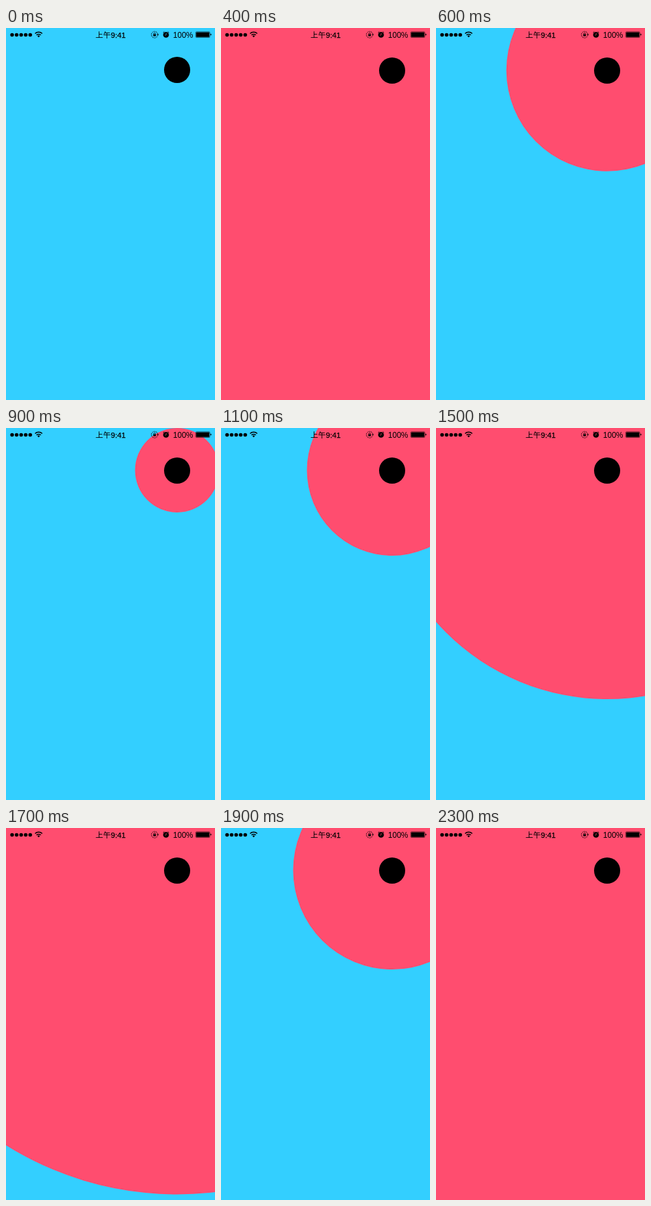
Recreate the animation shown at these times as an HTML page. Size 320 by 568 pixels, loop 2400 ms.

```html
<!DOCTYPE html>
<html lang="zh">
<head>
<meta charset="utf-8">
<style>
html, body { margin: 0; width: 100%; height: 100%; overflow: hidden; background: #33cfff; }
svg { display: block; width: 320px; height: 568px; }
text { font: 12px "Liberation Sans", Arial, "Noto Sans CJK SC", "Noto Sans CJK", sans-serif; }
.line { fill: none; stroke: #000; }
</style>
</head>
<body>
<svg viewBox="0 0 320 568">
  <rect width="320" height="568" fill="#33cfff"/>
  <circle id="page" cx="262" cy="64.5" fill="#ff4d6f"/>
  <circle id="button" cx="262" r="20"/>

  <!-- signal and wifi -->
  <path d="M9.3 10.5h28" stroke="#000" stroke-width="5.6" stroke-linecap="round" stroke-dasharray="0 6.95"/>
  <g class="line" stroke-width="1.5">
    <path d="M44.5 8.5a7.8 7.8 0 0 1 11 0"/>
    <path d="M46.6 10.8a4.8 4.8 0 0 1 6.8 0"/>
  </g>
  <path d="M50 14.2l-1.9-1.9a2.7 2.7 0 0 1 3.8 0z"/>

  <text x="137" y="14.6" style="font-size:11.7px">上午<tspan stroke="#000" stroke-width=".25">9:41</tspan></text>

  <!-- rotation lock -->
  <g class="line">
    <circle cx="227.5" cy="10.2" r="4.9" stroke-width=".8" stroke-dasharray="2.2 .8"/>
    <path d="M226.2 9.8v-1a1.3 1.3 0 0 1 2.6 0v1" stroke-width=".8"/>
  </g>
  <path d="M225.5 9.6h4v3h-4zM230.9 9.4h3.2l-1.6 2z"/>

  <!-- alarm -->
  <mask id="hands">
    <rect x="238" y="3" width="14" height="14" fill="#fff"/>
    <path d="M245.2 7.6v3l-1.8.6" fill="none" stroke="#000" stroke-width=".7"/>
  </mask>
  <circle cx="245" cy="10.4" r="4.4" mask="url(#hands)"/>
  <path class="line" d="M240.6 7.1l1.7-1.6M249.4 7.1l-1.7-1.6" stroke-width="1"/>

  <text x="255.8" y="15">100%</text>

  <!-- battery -->
  <rect class="line" x="290.5" y="5.7" width="21.6" height="8.8" rx="1.2" stroke-width=".5"/>
  <rect x="291.2" y="6.4" width="20.2" height="7.4" rx=".6"/>
  <path d="M313 8.6q1.5.3 1.5 1.5t-1.5 1.5z"/>
</svg>
<script>
const LOOP = 2400, STEP = 100, SMALL = 20, FULL = 600;
const page = document.getElementById("page");
const button = document.getElementById("button");

// start time, end time, start radius, end radius, easing power
const moves = [
  [0, 400, SMALL, FULL, 1.5],
  [400, 750, FULL, 42.5, 0.4],
  [750, 1700, 42.5, 495, 1.64],
  [1700, 2000, 495, SMALL, 0.8],
  [2000, 2300, SMALL, FULL, 1.5],
  [2300, LOOP, FULL, FULL, 1]
];

function radiusAt(time) {
  const [start, end, from, to, power] = moves.find(move => time < move[1]);
  return from + (to - from) * ((time - start) / (end - start)) ** power;
}

function draw() {
  const time = Math.floor(performance.now() % LOOP / STEP) * STEP;
  const radius = radiusAt(time);
  const open = radius > SMALL;
  page.setAttribute("r", open ? radius : 0);
  button.setAttribute("cy", open ? 65 : 64);
  requestAnimationFrame(draw);
}
draw();
</script>
</body>
</html>
```
